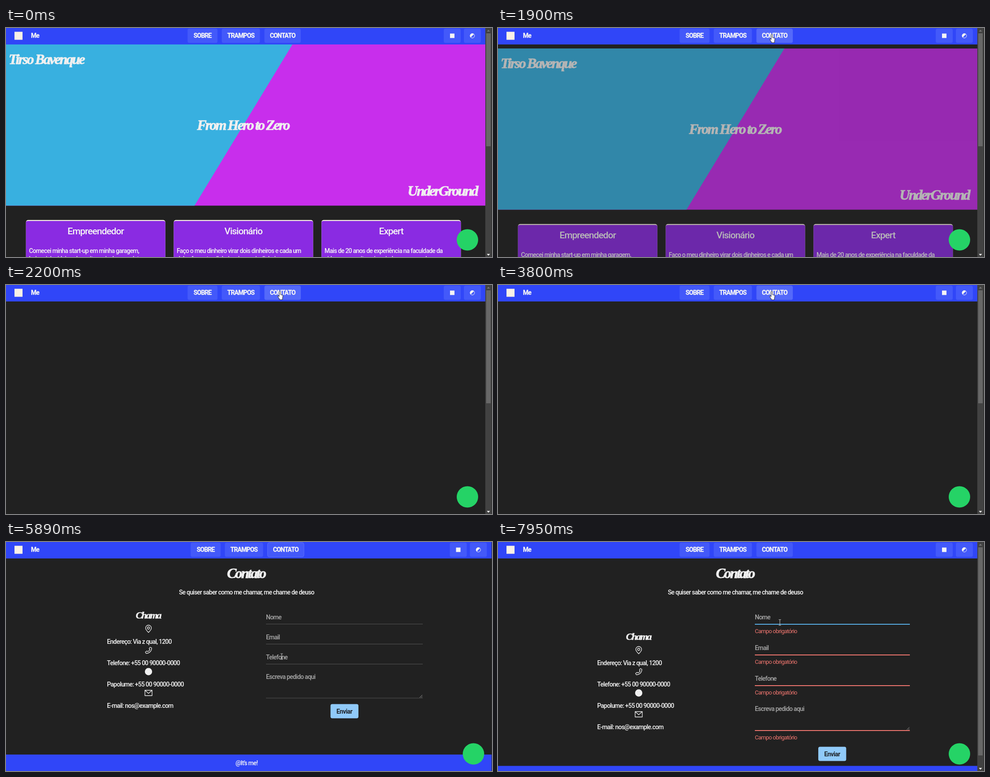
Animation of 1088 by 515 pixels, one loop 8 s. Source, as an HTML page:

```html
<!DOCTYPE html>
<html lang="pt">
<head>
<meta charset="utf-8">
<title>Me</title>
<style>
html, body { margin: 0; width: 100%; height: 100%; overflow: hidden; background: #212121; }
svg { display: block; width: 100vw; height: 100vh; }
text { font: 500 14px Roboto, sans-serif; letter-spacing: -.8px; fill: #f5f5f5; }
.mid { text-anchor: middle; }
.nav { font-weight: 700; letter-spacing: -.85px; stroke: #f5f5f5; stroke-width: .3; }
.head { font-size: 21px; letter-spacing: -1px; }
.script { font: italic 700 32px "Liberation Serif", serif; letter-spacing: -2.8px; fill: #f0f0f0; stroke: #f0f0f0; stroke-width: .9; }
.small { font-size: 22px; letter-spacing: -2px; stroke-width: .6; }
.label { fill: #a8a8a8; }
.error { font-size: 13px; font-weight: 400; fill: #f0766f; }
.send { fill: #1f2328; font-weight: 700; letter-spacing: -.6px; }
.icon { fill: none; stroke: #f0f0f0; stroke-width: 1.3; stroke-linejoin: round; stroke-linecap: round; }
.icon text { stroke: none; }
.pointer path { fill: #fff; stroke: #151515; stroke-width: .9; stroke-linejoin: round; }
.pointer .beam { fill: none; stroke: #d0d0d0; stroke-width: 1; }
</style>
</head>
<body>
<svg id="stage" viewBox="0 0 1088 515" preserveAspectRatio="none"></svg>
<script>
const stage = document.getElementById('stage');
const LOOP = 8000;
const EXIT = [1650, 2200];
const CONTACT = 4770, REVEAL = 5240, ERRORS = 7000;

const rect = (x, y, w, h, fill, extra = '') =>
  `<rect x="${x}" y="${y}" width="${w}" height="${h}" fill="${fill}" ${extra}/>`;
const text = (x, y, cls, str, extra = '') => `<text x="${x}" y="${y}" class="${cls}" ${extra}>${str}</text>`;

function card(i, title, lines) {
  const x = 44.7 + i * 330.8, w = 312;
  return rect(x, 431.7, w, 110, '#faf0e6', 'rx="5"') +
    `<path d="M${x} 437Q${x} 434 ${x + 5} 434h${w - 10}q5 0 5 3V545H${x}Z" fill="#8a2be2"/>` +
    text(x + w / 2, 464, 'head mid', title) +
    lines.map((line, n) => text(x + 6.7, 506 + n * 18, '', line)).join('');
}

function home() {
  return rect(0, 37, 1073, 362.5, '#c82eec') +
    '<path d="M0 37H641.200L422 399.500H0Z" fill="#38b0e0"/>' +
    text(6, 81, 'script', 'Tirso Bavenque') +
    text(530.5, 229, 'script mid', 'From Hero to Zero') +
    text(1055, 377, 'script', 'UnderGround', 'text-anchor="end"') +
    card(0, 'Empreendedor', ['Comecei minha start-up em minha garagem,', 'hoje minha ideia vale muito mais do que a lata']) +
    card(1, 'Visionário', ['Faço o meu dinheiro virar dois dinheiros e cada um', 'deles faz outro dinheiro virar mais dinheiro']) +
    card(2, 'Expert', ['Mais de 20 anos de experiência na faculdade da', 'vida e com muita coisa ainda para aprender']);
}

const icons = [
  '<path d="M0 8C-4 4-6.500 1.500-6.500-2A6.500 6.500 0 0 1 6.500-2C6.500 1.500 4 4 0 8Z"/><circle cy="-2" r="2.500"/>',
  '<path d="M3.500-7L7-5.500C7.500 2 1 7.500-5.500 7L-7 4-3.500 1.500-1.500 3Q2 1.500 3-1.500L1.500-3.500Z"/>',
  '<circle r="7.500" fill="#f0f0f0"/>',
  '<path d="M-8-6H8V6H-8ZM-8-6L0 1 8-6"/>'
];
const details = ['Endereço: Via z qual, 1200', 'Telefone: +55 00 90000-0000',
  'Papolume: +55 00 90000-0000', 'E-mail: nos@example.com'];

function field(x, w, label, labelY, lineY, error, focus) {
  let out = text(x, labelY, 'label', label) + rect(x, lineY - .5, w, 1, '#555');
  if (error) {
    out += rect(x, lineY - .5, w, 2, focus ? '#58afe8' : '#f0766f', 'class="underline"') +
      text(x, lineY + 20, 'error', 'Campo obrigatório');
  }
  return out;
}

function contact(o) {
  const [x, w] = o.form, end = x + w, bottom = o.lines[3];
  const labels = ['Nome', 'Email', 'Telefone', 'Escreva pedido aqui'];
  return text(o.center - 1, 81, 'script mid', 'Contato') +
    text(o.center, 118, 'mid', 'Se quiser saber como me chamar, me chame de deuso') +
    `<g transform="translate(${o.side})">` + text(318.5, 172, 'script small mid', 'Chama') +
    details.map((d, i) => `<g class="icon" transform="translate(319 ${195.5 + i * 48})">${icons[i]}</g>` +
      text(226, 229 + i * 48, '', d)).join('') + '</g>' +
    labels.map((l, i) => field(x, w, l, i < 3 ? o.lines[i] - 10.5 : bottom - 43.5, o.lines[i], o.error, i === 0)).join('') +
    `<path d="M${end - 7} ${bottom - 1}l6-6m-2.500 6l2.500-2.500" stroke="#aaa" stroke-width=".9"/>` +
    rect(...o.button, 62.5, 32, '#90caf9', 'rx="4" class="submit"') +
    text(o.button[0] + 31, o.button[1] + 21, 'send mid', 'Enviar');
}

function navButton(x, w, label, id) {
  return rect(x, 1.5, w, 32, '#4359fa', `rx="4" id="${id}"`) + text(x + w / 2, 22, 'nav mid', label);
}

stage.innerHTML =
  rect(0, 0, 1088, 515, '#212121') +
  `<g id="home">${home()}</g>` +
  `<g id="plain">${contact({ center: 538.5, side: '0 0', form: [582, 351], lines: [184.5, 229.5, 274.5, 351], button: [726.5, 364.5] })}</g>` +
  `<g id="invalid">${contact({ center: 531.5, side: '-4 48', form: [575, 347], lines: [184.5, 253.5, 322.5, 423.5], button: [717, 460.5], error: true })}</g>` +
  `<g id="footer">${rect(0, 0, 1087, 60, '#3046f8')}${text(538.5, 24, 'mid', '@It’s me!')}</g>` +
  rect(0, 0, 1087, 37, '#3046f8') +
  rect(19, 8.5, 18, 18, '#faf0e6') +
  text(56, 22, 'nav', 'Me') +
  '<g id="menu">' + navButton(406.5, 67, 'SOBRE', 'about') + navButton(483, 85.5, 'TRAMPOS', 'works') +
  navButton(578.5, 81.5, 'CONTATO', 'reach') + '</g>' +
  '<g id="tools">' + rect(980, 1.5, 38, 32, '#4359fa', 'rx="4"') + rect(1025, 1.5, 38, 32, '#4359fa', 'rx="4"') +
  rect(994, 12.5, 10, 10, '#f5f5f5') +
  '<circle cx="1044" cy="17.500" r="5" fill="none" stroke="#f5f5f5"/>' +
  '<path d="M1040.300 21.200A5.200 5.200 0 0 1 1047.700 13.800Z" fill="#f5f5f5"/>' +
  '<circle cx="1033" cy="476.500" r="24" fill="#25d366"/></g>' +
  '<g id="scrollbar">' + rect(1073, 0, 14, 515, '#424242') + rect(1075, 12, 10, 254, '#686868', 'id="thumb"') +
  '<path d="M1076.500 8h7l-3.500-4z" fill="#777"/><path d="M1076.500 508h7l-3.500 4z" fill="#fff"/></g>' +
  rect(1087, 0, 1, 515, '#2b2b2b') +
  '<g id="pointer" class="pointer"><path id="arrow" d="M0 0V13.500L3 10.700 5 15.300 7.200 14.400 5.200 9.800H9.300Z"/>' +
  '<path id="hand" d="M-1.500 1.500A1.400 1.400 0 0 1 1.300 1.500V7.500L5.400 8.500Q7.200 9 6.900 11L6 15.500V19H-1V17L-4.600 12Q-5 10 -3.200 10.500L-1.500 12.200Z"/>' +
  '<path id="beam" class="beam" d="M-2.500-6.500H-.8L0-6 .8-6.500H2.500M0-6V6M-2.500 6.500H-.8L0 6 .8 6.500H2.500"/></g>';

const el = {};
stage.querySelectorAll('[id]').forEach(n => el[n.id] = n);
const submits = [...stage.querySelectorAll('.submit')];
const underlines = [...stage.querySelectorAll('.underline')].map(node => ({
  node, x: +node.getAttribute('x'), w: +node.getAttribute('width')
}));

const ramp = (t, from, to) => Math.min(1, Math.max(0, (t - from) / (to - from)));
const easeOut = p => 1 - (1 - p) ** 2;
const pulse = (t, on, off, fade) => ramp(t, on, on + fade) - ramp(t, off, off + fade);
const mix = (a, b, p) => `rgb(${a.map((v, i) => Math.round(v + (b[i] - v) * p))})`;
const show = (node, on) => node.setAttribute('display', on ? 'inline' : 'none');
const move = (node, x, y) => node.setAttribute('transform', `translate(${x.toFixed(2)} ${y.toFixed(2)})`);

// time, x, y of the pointer's hot spot
const path = [
  [220, 1046, 508], [320, 860, 400], [400, 776, 346], [450, 736, 325], [500, 706, 309],
  [640, 706, 309], [710, 695, 275], [800, 623, 149], [860, 604, 115], [920, 563, 52],
  [960, 543, 31], [1020, 526, 17], [1130, 575, 12], [1240, 613, 14],
  [3800, 613, 14], [3960, 588, 50], [4200, 492, 110], [4440, 460, 125],
  [5240, 460, 125], [5500, 515, 165], [5720, 594, 245], [5890, 617, 258], [6010, 641, 209],
  [6110, 641, 209], [6220, 680, 276], [6360, 742, 358], [6480, 757, 375],
  [7000, 757, 375], [7250, 708, 292], [7500, 648, 205], [7750, 627, 178],
  [7880, 627, 178], [7950, 631, 181]
];

function pointerAt(t) {
  const i = path.findIndex(k => k[0] > t);
  if (i < 0) return path[path.length - 1].slice(1);
  const a = path[Math.max(0, i - 1)], b = path[i], p = ramp(t, a[0], b[0]);
  return [a[1] + (b[1] - a[1]) * p, a[2] + (b[2] - a[2]) * p];
}

const inside = (x, y, l, t, r, b) => x >= l && x <= r && y >= t && y <= b;
function pointerKind(t, x, y) {
  if (inside(x, y, 483, 1, 568, 34) || inside(x, y, 578, 1, 660, 34)) return 'hand';
  if (t < REVEAL) return 'arrow';
  if (t < ERRORS && inside(x, y, 726, 364, 789, 397)) return 'hand';
  const rows = t < ERRORS ? [[158, 185], [203, 230], [248, 275], [292, 351]] : [[158, 185], [227, 254], [296, 323], [364, 423]];
  return x > 578 && rows.some(r => y >= r[0] && y <= r[1]) ? 'beam' : 'arrow';
}

function render(t) {
  const wide = t >= CONTACT && t < ERRORS;
  const leave = ramp(t, ...EXIT) ** 1.6;
  show(el.home, t < EXIT[1]);
  el.home.setAttribute('opacity', 1 - leave);
  move(el.home, 0, 32 * leave);

  show(el.plain, t >= REVEAL && wide);
  el.plain.setAttribute('opacity', easeOut(ramp(t, REVEAL, 5780)));
  show(el.invalid, t >= ERRORS);
  show(el.footer, t >= CONTACT);
  move(el.footer, 0, t < ERRORS ? 478 : 503.5);

  move(el.menu, wide ? 7 : 0, 0);
  move(el.tools, wide ? 13.5 : 0, 0);
  show(el.scrollbar, !wide);
  el.thumb.setAttribute('height', t < ERRORS ? 254 : 468);

  const rest = [67, 89, 250], lit = [84, 105, 250];
  el.works.setAttribute('fill', mix(rest, lit, pulse(t, 960, 1080, 100)));
  el.reach.setAttribute('fill', mix(rest, lit, pulse(t, 1130, REVEAL, 100)));
  el.reach.setAttribute('stroke', t >= REVEAL && t < ERRORS ? '#5c70fb' : 'none');

  const hover = pulse(t, 6340, ERRORS, 140);
  const press = pulse(t, 6750, 6900, 50);
  submits.forEach(n => n.setAttribute('fill', mix([144, 202, 249], [66, 165, 245], hover * (1 - .25 * press))));

  const grow = easeOut(ramp(t, ERRORS, ERRORS + 200));
  underlines.forEach(({ node, x, w }) => {
    node.setAttribute('x', x + w * (1 - grow) / 2);
    node.setAttribute('width', w * grow);
  });

  const [x, y] = pointerAt(t), kind = pointerKind(t, x, y);
  show(el.pointer, t >= 220);
  move(el.pointer, x, y);
  ['arrow', 'hand', 'beam'].forEach(k => show(el[k], k === kind));
}

const start = performance.now();
function tick() {
  render((performance.now() - start) % LOOP);
  requestAnimationFrame(tick);
}
tick();
</script>
</body>
</html>
```
